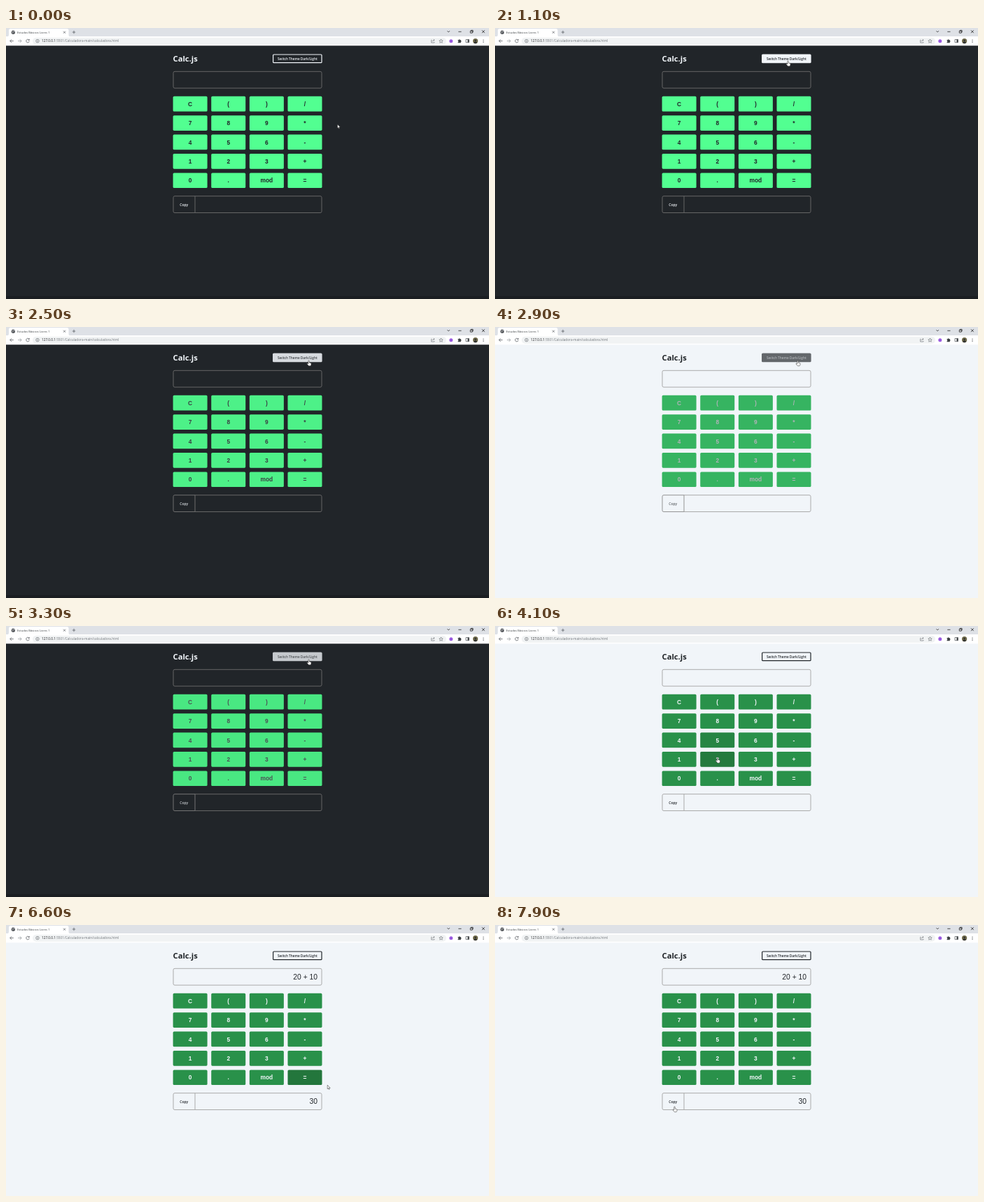
These frames come from a looping animation (690x388 px, 8000 ms). An HTML page:

```html
<!DOCTYPE html>
<html lang="pt">
<head>
<meta charset="utf-8">
<title>Calc.js</title>
<style>
  html, body { margin: 0; width: 100%; height: 100%; overflow: hidden; background: #212529; }
  svg { display: block; width: 100vw; height: 100vh; }
  text { white-space: pre; }
  .ui { font-family: "Open Sans", "Noto Sans", sans-serif; }
  .key, .num { font-family: "Liberation Sans", Arial, sans-serif; }
  .key { font-size: 8.4px; font-weight: 700; text-anchor: middle; }
  .num { font-size: 10.3px; text-anchor: end; }
  .label { font-weight: 600; text-anchor: middle; }
  .line { fill: none; stroke: #5f6368; stroke-width: .8; }
</style>
</head>
<body>
<svg viewBox="0 0 690 388" preserveAspectRatio="none">
  <rect id="page" y="25" width="690" height="363"/>
  <rect id="edge" y="384" width="690" height="4" fill="#1b1e21"/>

  <g class="ui">
    <rect width="690" height="13" fill="#dee1e6"/>
    <path d="M1 12.5Q4 12.5 4 9.500V3.500Q4 1 6.500 1H87Q89.500 1 89.500 3.500V9.500Q89.500 12.500 92 12.500Z" fill="#fff"/>
    <rect y="12" width="690" height="13.300" fill="#fff"/>
    <rect x="38" y="13.700" width="591" height="10" rx="5" fill="#f1f3f4"/>
    <circle cx="10.300" cy="6.200" r="2.600" fill="#4a4d51"/>
    <path d="M8.400 5.200l1.800 .7-.7 1.600M10.800 4.200l.5 1.200 1.200.2" fill="none" stroke="#fff" stroke-width=".6"/>
    <text x="16" y="7.700" font-size="4.150" fill="#3c4043">Estudos Básicos Livres 1</text>
    <path class="line" d="M82 4.700l3 3m0-3l-3 3M97 3.800v4.400M94.800 6h4.400"/>
    <path class="line" d="M630.500 4.200l1.700 1.700 1.700-1.700M646.300 5.300h4.200M663.300 4.200h2.900v2.900h-2.900zM664.300 4.200v-.9h2.800v2.800h-.9M680 3.300l3.800 3.800m0-3.800l-3.800 3.800" style="stroke:#222"/>
    <path class="line" d="M10.800 18.600h-5m2.300-2.400l-2.400 2.400 2.400 2.400"/>
    <path class="line" d="M17 18.600h5m-2.300-2.400l2.400 2.400-2.400 2.400" style="stroke:#9a9da1"/>
    <path class="line" d="M33 17.300a2.300 2.300 0 1 0 .3 1.900M33.300 16v1.700h-1.800"/>
    <circle class="line" cx="45" cy="18.600" r="2.300" style="stroke-width:.6"/>
    <path class="line" d="M45 18.300v1.500M45 17.100v.6"/>
    <text x="51" y="20.300" font-size="4.720" fill="#70757a"><tspan fill="#202124">127.0.0.1</tspan>:5501/Calculadora-main/calculadora.html</text>
    <path class="line" d="M608.500 17.200h-.8v3.800h4.300v-1M609.300 19.300q.3-2 2.600-2m-1-1.200l1.300 1.200-1.300 1.200" style="stroke-width:.6"/>
    <path class="line" d="M621.500 16l.8 1.800 1.900.2-1.400 1.300.4 1.900-1.700-1-1.700 1 .4-1.900-1.400-1.300 1.900-.2z" style="stroke-width:.6"/>
    <circle cx="635.800" cy="18.700" r="2.500" fill="#9a5be0"/>
    <path d="M645.600 17h1.300a.8 .8 0 0 1 1.600 0h1.300v1.300a.8 .8 0 0 1 0 1.600v1.400h-4.200v-1.400a.8 .8 0 0 0 0-1.600z" fill="#3c4043"/>
    <path class="line" d="M657 16.500h4.400v4.200h-4.400z"/>
    <path d="M659.500 16.500h2v4.200h-2z" fill="#3c4043"/>
    <circle cx="670.600" cy="18.600" r="3.600" fill="#6f6a4a"/>
    <path d="M668.200 21.300a2.500 2.500 0 0 1 4.800 0 3.600 3.600 0 0 1-4.800 0z" fill="#2f3030"/>
    <circle cx="670.600" cy="18" r="1.200" fill="#2f3030"/>
    <g fill="#4a4d51"><circle cx="682" cy="16.800" r=".55"/><circle cx="682" cy="18.600" r=".55"/><circle cx="682" cy="20.400" r=".55"/></g>
  </g>

  <text id="title" class="ui" x="238.500" y="47.700" font-size="11.200" font-weight="700">Calc.js</text>
  <rect id="switch" x="381.600" y="38" width="69.400" height="11.700" rx="1" stroke-width="1.200"/>
  <text id="switchText" class="ui label" x="416.400" y="45.500" font-size="4.700">Switch Theme Dark/Light</text>
  <g id="frames" fill="none" stroke-width="1">
    <rect x="239" y="62.300" width="212" height="23.800" rx="2"/>
    <path d="M270 240.700h179q2 0 2 2v19.800q0 2-2 2h-179"/>
  </g>
  <path id="copy" d="M270 240.700h-29q-2 0-2 2v19.800q0 2 2 2h29z" fill="none"/>
  <text id="copyText" class="ui label" x="254.200" y="254.500" font-size="5">Copy</text>
  <g id="keys"></g>
  <text id="input" class="num" x="445" y="77.600"></text>
  <text id="result" class="num" x="445" y="256.200"></text>

  <g id="cursor" fill="#fff" stroke="#222" stroke-width=".5" stroke-linejoin="round">
    <path id="arrow" d="M0 0V5.600L1.300 4.400 2.100 6.300 3 5.900 2.200 4.100H4Z"/>
    <path id="hand" d="M-.7 .7a.7 .7 0 0 1 1.400 0V3l2 .5q1 .3 .9 1.300l-.4 1.900q-.2 1-1.200 1H.3q-.6 0-1-.6L-2.500 4.900q-.3-.7 .5-.8 .6 0 1.300 .8z"/>
  </g>
</svg>
<script>
const LOOP = 8000, TICK = 100, FADE = 150;
const $ = id => document.getElementById(id);
const INK = [33, 37, 41], PAPER = [241, 245, 249];
const MINT = [82, 255, 145], GREEN = [41, 145, 74], DEEP = [35, 117, 60];
const GREY = [102, 102, 102], SILVER = [170, 170, 170];

// cursor tip: time, x, y
const path = [
  [0, 473.5, 138], [500, 432, 44], [650, 432, 44], [1100, 418.5, 47],
  [1850, 418.5, 47], [2300, 432.5, 48], [3650, 432.5, 48], [4050, 318, 188.5],
  [4300, 318, 188.5], [4600, 266, 214], [4750, 266, 214], [5050, 428, 187],
  [5200, 428, 187], [5500, 281.7, 194.5], [5620, 266, 189], [5750, 266, 189],
  [5920, 266, 214], [6000, 266, 214], [6300, 429, 215], [6500, 429, 215],
  [7000, 580, 286], [7300, 490, 270], [7900, 256.5, 260], [8000, 256.5, 260]
];
const themes = [[0, 0], [1585, 1], [2412, 0], [2840, 1], [3227, 0], [3640, 1]];
const typed = [[0, ""], [4300, "2"], [4700, "20"], [5100, "20 + "], [5700, "20 + 1"], [6000, "20 + 10"]];
const answers = [[0, ""], [6500, "30"]];

const last = (list, t) => list.filter(s => s[0] <= t).pop();
const lerp = (a, b, p) => a + (b - a) * p;
const mix = (a, b, p) => a.map((v, i) => lerp(v, b[i], p));
const rgb = c => `rgb(${c.map(Math.round)})`;
const paint = (el, fill, stroke) => {
  el.setAttribute("fill", fill);
  if (stroke) el.setAttribute("stroke", stroke);
};

// the CSS "ease" curve
function ease(x) {
  if (x <= 0) return 0;
  if (x >= 1) return 1;
  const bez = (a, b, s) => 3 * a * s * (1 - s) ** 2 + 3 * b * s * s * (1 - s) + s ** 3;
  let lo = 0, hi = 1;
  for (let i = 0; i < 20; i++) {
    const mid = (lo + hi) / 2;
    if (bez(.25, .25, mid) < x) lo = mid; else hi = mid;
  }
  return bez(.1, 1, lo);
}

function tip(t) {
  if (t <= 0) return path[0].slice(1);
  const i = Math.min(path.length - 1, path.findIndex(p => p[0] > t));
  const [t0, x0, y0] = path[i - 1], [t1, x1, y1] = path[i];
  const p = (t - t0) / (t1 - t0);
  return [lerp(x0, x1, p), lerp(y0, y1, p)];
}

const inside = (b, [x, y]) => x >= b.x && x <= b.x + b.w && y >= b.y && y <= b.y + b.h;

// share of the last FADE ms spent over a box
function hover(box, t) {
  let n = 0;
  for (let d = 0; d < FADE; d += 10) n += inside(box, tip(t - d));
  return ease(n * 10 / FADE);
}

function add(parent, tag, attrs, text = "") {
  const el = document.createElementNS("http://www.w3.org/2000/svg", tag);
  for (const k in attrs) el.setAttribute(k, attrs[k]);
  el.textContent = text;
  return parent.appendChild(el);
}

const keys = "C ( ) / 7 8 9 * 4 5 6 - 1 2 3 + 0 . mod =".split(" ").map((name, i) => {
  const box = { x: 238.6 + i % 4 * 54.63, y: 97.8 + Math.floor(i / 4) * 27.4, w: 49, h: 21.7 };
  const rect = add($("keys"), "rect", { x: box.x, y: box.y, width: box.w, height: box.h, rx: 1.6 });
  const label = add($("keys"), "text", { class: "key", x: box.x + box.w / 2, y: box.y + 13.9 }, name);
  return { box, rect, label };
});
const switchBox = { x: 381, y: 37.5, w: 70.5, h: 12.7 };
const copyBox = { x: 239, y: 240, w: 31, h: 25 };

function draw(t) {
  const [since, light] = last(themes, t);
  const p = since ? ease((t - since) / FADE) : 1;
  const b = light ? p : 1 - p;
  const fg = mix(PAPER, INK, b), back = mix(INK, PAPER, b);

  paint($("page"), rgb(light ? PAPER : INK));
  $("edge").setAttribute("opacity", light ? 0 : 1);
  paint($("title"), rgb(light ? INK : PAPER));
  paint($("frames"), "none", rgb(light ? SILVER : GREY));
  paint($("copy"), "none", rgb(mix(GREY, SILVER, b)));
  paint($("copyText"), rgb(fg));

  const over = hover(switchBox, t);
  paint($("switch"), rgb(mix(light ? PAPER : INK, fg, over)), rgb(fg));
  paint($("switchText"), rgb(mix(fg, back, over)));

  for (const { box, rect, label } of keys) {
    paint(rect, rgb(mix(mix(MINT, GREEN, b), DEEP, hover(box, t))));
    paint(label, rgb(mix(INK, PAPER, b)));
  }

  for (const [id, list] of [["input", typed], ["result", answers]]) {
    $(id).textContent = last(list, t)[1];
    paint($(id), rgb(fg));
  }

  const at = tip(t);
  const onButton = [switchBox, copyBox, ...keys.map(k => k.box)].some(box => inside(box, at));
  $("cursor").setAttribute("transform", `translate(${at})`);
  $("hand").style.display = onButton ? "" : "none";
  $("arrow").style.display = onButton ? "none" : "";
}

const start = performance.now();
function frame() {
  const t = (performance.now() - start) % LOOP;
  draw(Math.floor(t / TICK) * TICK);
  requestAnimationFrame(frame);
}
draw(0);
requestAnimationFrame(frame);
</script>
</body>
</html>
```
